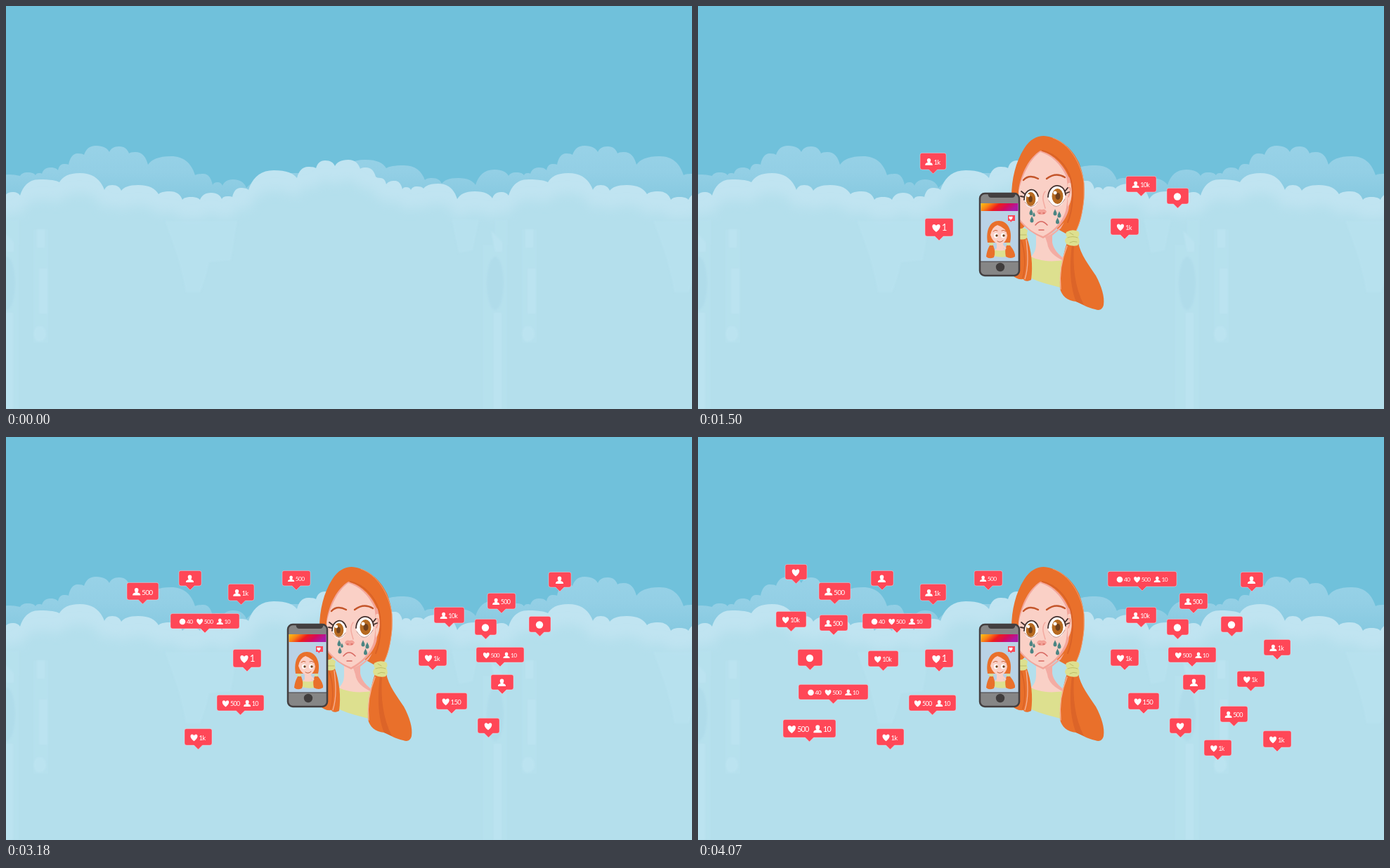
Write an HTML page that moves like this. It is 976 by 574 pixels and loops after 4.17 s.

```html
<!DOCTYPE html>
<html lang="en">
<head>
<meta charset="utf-8">
<title>Likes and tears</title>
<style>
html, body { margin: 0; width: 100%; height: 100%; overflow: hidden; background: #70c1db; }
svg { display: block; width: 976px; height: 574px; }
text { font-family: Lato, "Open Sans", sans-serif; font-size: 9px; letter-spacing: -.7px; fill: #fff; }
.line { fill: none; stroke-linecap: round; stroke-linejoin: round; }
</style>
</head>
<body>
<svg viewBox="0 0 976 574">
  <defs>
    <linearGradient id="haze" gradientUnits="userSpaceOnUse" x1="0" y1="198" x2="0" y2="276">
      <stop offset="0" stop-color="#98d2e7"/><stop offset=".5" stop-color="#93cfe5"/><stop offset="1" stop-color="#86c9e0"/>
    </linearGradient>
    <linearGradient id="stripe" x2="1" y2=".25">
      <stop offset="0" stop-color="#fdc413"/><stop offset=".25" stop-color="#f98416"/><stop offset=".5" stop-color="#ee1c1c"/>
      <stop offset=".75" stop-color="#d60a5c"/><stop offset="1" stop-color="#ad1aa4"/>
    </linearGradient>
    <filter id="soft" x="-5%" y="-10%" width="110%" height="120%"><feGaussianBlur stdDeviation="8"/></filter>
    <filter id="fuzz" x="-20%" y="-5%" width="140%" height="110%"><feGaussianBlur stdDeviation="1"/></filter>
    <path id="heart" d="M0 4.9C-2-2.6 0 0 0 4.9C-6 .8-5.6-4.2-2.6-4.2C-1.2-4.2-.4-3.3 0-2.4C.4-3.3 1.2-4.2 2.6-4.2C5.6-4.2 6 .8 0 4.9Z"/>
    <path id="person" d="M-2.5-2.1A2.5 2.7 0 1 1 2.5-2.1Q2.3 .1 1.3 .8C3.6 1.2 5 2.1 5 4.4H-5C-5 2.1-3.6 1.2-1.3 .8Q-2.3 .1-2.5-2.1Z"/>
    <circle id="dot" r="4.6"/>
    <path id="tear" d="M0-5C.8-2.2 2.5-.6 2.5 1.8A2.5 2.6 0 0 1-2.5 1.8C-2.5-.6-.8-2.2 0-5Z"/>
  </defs>

  <rect width="976" height="574" fill="#70c1db"/>
  <path id="back" fill="url(#haze)"/>
  <path id="front" fill="#c0e4f1"/>
  <path id="body" fill="#b4dfec" transform="translate(0 29)" filter="url(#soft)"/>
  <rect y="330" width="976" height="244" fill="#b4dfec"/>

  <g id="drips" filter="url(#fuzz)">
    <path fill="#b8e2ef" opacity=".75" d="M226 306H329L320 362L289 365Q284 390 276 408H256Q249 370 240 345ZM634 304H673L664 348L644 352Z"/>
    <path fill="#b9e2ef" opacity=".55" d="M678 340H713V574H678ZM734 318H755V480H734ZM695 304H714V340H695Z"/>
    <ellipse cx="696" cy="395" rx="12" ry="38" fill="#b0dcea"/>
    <path fill="#bbe3f0" d="M694 437H705V574H694ZM739 318H750V344H739ZM742 374H754V438H742ZM690 320L706 336V350H696Z"/>
    <ellipse cx="743" cy="467" rx="9" ry="11" fill="#bbe3f0"/>
  </g>
  <use href="#drips" x="-695"/><use href="#drips" x="695"/>

  <g id="girl">
    <!-- hair behind the face -->
    <path fill="#e9702b" d="M446 272C446 246 452 222 464 203C472 190 482 185 492 185C514 187 532 202 542 223C548 238 551 254 549 276C547 296 543 311 537 322L523 324L480 300L458 320L446 300Z"/>
    <path class="line" stroke="#f19a6c" stroke-width="1" d="M505 188C528 196 545 223 549 252V274C547 296 543 310 538 320"/>
    <!-- neck and shirt -->
    <path fill="#f9d0c6" d="M481 318H504V338C506 348 513 354 521 360V372L474 371V357C479 351 481 347 481 338Z"/>
    <path fill="#f3aca3" d="M494 329C505 325 513 317 521 308L516 317L504 327V337C506 347 513 354 521 360V363C508 358 498 349 497 338Z"/>
    <path fill="#dde08f" d="M472 356C480 361 497 366 519 362V402C505 398 490 395 472 387Z"/>
    <!-- face -->
    <path fill="#f3a59a" d="M487 206C503 210 519 224 527 243C534 249 534 270 528 285C527 302 511 321 491 331Q470 322 456 305V263C459 239 471 216 487 206Z"/>
    <path fill="#fad0c6" d="M487 208C502 212 516 225 524 243C527 257 526 279 523 292C519 307 505 321 491 328C475 323 463 311 456 301V265C461 242 472 218 487 208Z"/>
    <path fill="#f9cdbf" d="M526 253Q533 248 532 265Q531 280 526 286Z"/>
    <path class="line" stroke="#ee8f82" stroke-width="1.2" d="M527 259Q531 257 529 266L527 272"/>
    <path class="line" stroke="#da6227" stroke-width="2" d="M490 206C510 211 524 227 530 245C535 265 533 291 526 308"/>
    <!-- brows -->
    <path class="line" stroke="#c4552a" stroke-width="2.4" d="M463 248Q471 239 484 246M496 246Q509 236 522 244"/>
    <!-- eyes -->
    <g fill="#fff">
      <ellipse cx="474" cy="274" rx="10" ry="13"/><ellipse cx="510" cy="271" rx="12" ry="15"/>
    </g>
    <g fill="#b66a20">
      <ellipse cx="473.500" cy="275" rx="6.800" ry="10"/><ellipse cx="511.500" cy="271" rx="8" ry="11"/>
    </g>
    <g fill="#70401b">
      <ellipse cx="473" cy="275" rx="2.800" ry="4.500"/><ellipse cx="512" cy="271" rx="3.500" ry="5"/>
    </g>
    <g fill="#fff"><circle cx="470" cy="270" r="2.200"/><circle cx="508" cy="266" r="2.500"/></g>
    <path class="line" stroke="#43302d" stroke-width="1.8" d="M464 276C464 260 480 256 484 271M465 268L460 264M464 272L459 271M498 272C499 252 521 250 523 269M522 264L526 259M523 267L528 265"/>
    <path class="line" stroke="#b57a70" stroke-width=".9" d="M465 279Q474 293 483 279M499 277Q510 295 522 275"/>
    <!-- nose and mouth -->
    <path class="line" stroke="#f3aaa0" stroke-width="1.5" d="M494 264C488 272 492 280 494 288"/>
    <path fill="#f3a197" d="M482 293Q484 288 489 290Q494 288 496 293Q493 298 489 297Q484 298 482 293Z"/>
    <path class="line" stroke="#d76760" stroke-width="1.5" d="M485 295H487M491 295H493M480 312Q488 302 497 312M485 319H492"/>
    <g fill="#4b8583">
      <use href="#tear" x="474" y="293.500"/><use href="#tear" transform="translate(478 297) scale(.7)"/><use href="#tear" x="475" y="304"/>
      <use href="#tear" x="508" y="294"/><use href="#tear" x="514" y="297"/><use href="#tear" x="511.500" y="306"/>
    </g>
    <!-- pigtails -->
    <path fill="#e9702b" d="M456 330H468C474 347 477 369 474 390C469 393 464 392 463 389C457 390 452 388 448 384Z"/>
    <path class="line" stroke="#f6b195" stroke-width="1.3" d="M467 333C469 350 471 370 465 389"/>
    <path class="line" stroke="#da6227" stroke-width="1.6" d="M460 334C466 352 466 374 462 387"/>
    <path fill="#e9702b" d="M525 337H541C544 354 557 370 566 384C574 399 579 414 577 426C575 433 571 434 565 432C554 430 546 424 538 421C525 420 517 412 515 402C514 380 519 356 525 337Z"/>
    <path fill="#dc6428" d="M532 341C529 364 528 397 538 421L549 426C536 400 533 371 535 341Z"/>
    <path class="line" stroke="#f6b195" stroke-width="1.4" d="M525 342C517 362 514 384 516 403"/>
    <path fill="#dde08f" d="M456 318Q466 314 469 320Q467 325 469 328Q467 334 457 332ZM524 322Q532 317 541 321Q544 325 541 329Q545 336 540 341Q532 343 524 339Q520 333 525 329Q522 326 524 322Z"/>
    <path class="line" stroke="#bdbd68" stroke-width="1" d="M458 326H467M526 330Q533 327 540 330M529 337Q534 334 539 336M529 323L534 326"/>

    <!-- phone -->
    <rect x="401" y="267" width="56" height="117" rx="7" fill="#868686" stroke="#433f40" stroke-width="2.500"/>
    <path fill="#433f40" d="M411 266H454Q451 267 451 270Q450 273 447 273H417Q414 273 413 270Q413 267 411 266Z"/>
    <rect x="402.500" y="281" width="53" height="83" fill="#b9d2e6"/>
    <rect x="402.500" y="281" width="53" height="11" fill="url(#stripe)"/>
    <path class="line" stroke="#433f40" d="M402 364H456"/>
    <circle cx="430" cy="372" r="6.200" fill="#403d3d"/>
    <!-- picture on the screen -->
    <path fill="#e9702b" d="M412 337C409 318 416 306 428 306C440 306 448 319 444 337Z"/>
    <path fill="#f9d0c6" d="M425 335H434V345L440 350H420L425 345Z"/>
    <path fill="#dde08f" d="M420 347Q430 350 439 347L440 357Q430 359 421 356Z"/>
    <path fill="#fad0c6" d="M416 326Q418 315 426 312Q439 316 440 327Q439 336 430 341Q419 337 416 326Z"/>
    <path fill="#e9702b" d="M415 341H420Q424 351 421 358Q414 361 410 357Q411 348 415 341ZM439 341H444Q452 351 451 357Q445 361 438 357Q436 348 439 341Z"/>
    <path class="line" stroke="#dde08f" stroke-width="3" d="M415 339H419M440 339H443"/>
    <path class="line" stroke="#fad0c6" stroke-width="3" d="M434 342L437 345"/>
    <g fill="#fff"><ellipse cx="424" cy="327" rx="3" ry="3.400"/><ellipse cx="434" cy="327" rx="3" ry="3.400"/></g>
    <g fill="#70401b"><circle cx="425" cy="327" r="1.700"/><circle cx="435" cy="327" r="1.700"/></g>
    <path class="line" stroke="#c4552a" stroke-width=".9" d="M420 321Q423 318 426 320M432 320Q435 318 438 321M426 335Q430 338 434 334"/>
    <path fill="#ff4757" d="M441 298H451V306H447L445 308L444 306H441Z"/>
    <use href="#heart" fill="#fff" transform="translate(445 302) scale(.55)"/>
  </g>
  <g id="likes"></g>
</svg>
<script>
const NS = "http://www.w3.org/2000/svg";
const LOOP = 4170, PERIOD = 695;
const get = id => document.getElementById(id);

function add(parent, tag, attrs) {
  const el = parent.appendChild(document.createElementNS(NS, tag));
  for (const k in attrs) el.setAttribute(k, attrs[k]);
  return el;
}

// Each bump: valley x, valley y, peak x, peak y
const backBumps = [
  [20, 242, 31, 237], [42, 241, 47, 238], [51, 239, 63, 230], [74, 234, 82, 225],
  [89, 226, 102, 210], [111, 212, 128, 199], [147, 208, 161, 200], [175, 210, 184, 208],
  [202, 226, 235, 214], [269, 241, 281, 239], [294, 255, 301, 251], [308, 256, 323, 247],
  [342, 259, 415, 238], [480, 232, 512, 219], [541, 231, 566, 227], [596, 248, 606, 245],
  [620, 253, 643, 245], [668, 255, 695, 233]
];
const frontBumps = [
  [20, 270, 48, 247], [76, 251, 105, 238], [140, 262, 151, 255], [164, 263, 188, 255],
  [217, 268, 233, 264], [251, 276, 263, 272], [276, 276, 292, 266], [307, 275, 315, 271],
  [322, 272, 334, 259], [345, 262, 381, 234], [414, 245, 430, 229], [441, 231, 454, 220],
  [468, 228, 487, 219], [504, 232, 512, 230], [526, 243, 533, 245], [541, 254, 553, 249],
  [564, 261, 569, 258], [576, 262, 585, 257], [594, 260, 615, 253], [642, 275, 667, 264],
  [692, 274, 704, 265]
];

function ridge(bumps, shifts, lead) {
  const side = (vx, vy, px, py) => [vx + (px - vx) * .15, vy + (py - vy) * .6, px - (px - vx) * .55, py];
  let d = lead;
  for (const s of shifts) bumps.forEach(([vx, vy, px, py], i) => {
    const next = bumps[i + 1] || [bumps[0][0] + PERIOD, bumps[0][1]];
    const a = side(vx + s, vy, px + s, py);
    const b = side(next[0] + s, next[1], px + s, py);
    d += `L${vx + s} ${vy}C${a} ${px + s} ${py}C${b[2]} ${b[3]} ${b[0]} ${b[1]} ${next[0] + s} ${next[1]}`;
  });
  return d + "V640H-60Z";
}
get("back").setAttribute("d", ridge(backBumps, [0, PERIOD], "M-60 242L-10 242Q4 238 20 242"));
const front = ridge(frontBumps, [-PERIOD, 0, PERIOD], "M-675 640");
get("front").setAttribute("d", front);
get("body").setAttribute("d", front);

// Badges in order of arrival: left, top, width, height, then icon + count
const badges = `323 302 40 26 h1|587 302 40 24 h1k|609 242 43 23 p10k|316 209 37 24 p1k
667 259 31 23 d|393 190 40 22 p500|612 364 44 24 h150|300 367 67 23 h500 p10
685 222 40 23 p500|669 299 68 22 h500 p10|234 251 98 22 d40 h500 p10|690 338 32 22 p
254 415 39 24 h1k|744 255 31 23 d|172 207 45 25 p500|671 400 31 22 h|246 190 32 22 p
772 192 32 22 p|173 253 40 23 p500|805 288 38 23 p1k|111 248 43 23 h10k|743 383 39 23 p500
142 302 35 24 d|720 431 39 23 h1k|143 352 99 22 d40 h500 p10|121 402 75 26 h500 p10
767 333 39 23 h1k|242 304 43 23 h10k|583 191 98 22 d40 h500 p10|124 181 31 22 h|804 418 40 24 h1k`
  .split(/[|\n]/).map(row => row.split(" "));

const waits = [[3, 300], [5, 200], [4, 150], [4, 100], [2, 80], [4, 80], [4, 60], [1, 60], [3, 50], [1, 40]]
  .flatMap(([n, ms]) => Array(n).fill(ms));
const icons = { h: "heart", p: "person", d: "dot" };

function badge(row) {
  const [x, y, w, h] = row.slice(0, 4).map(Number), items = row.slice(4);
  const g = add(get("likes"), "g", { transform: `translate(${x} ${y})`, display: "none" });
  const m = w / 2;
  add(g, "path", {
    fill: "#ff4757", stroke: "#ffd9e0", "stroke-opacity": .55, "stroke-width": .8,
    d: `M3 .4H${w - 3}Q${w} .4 ${w} 3V${h - 3}Q${w} ${h} ${w - 3} ${h}H${m + 6}L${m} ${h + 6}L${m - 6} ${h}H3Q0 ${h} 0 ${h - 3}V3Q0 .4 3 .4Z`
  });
  const solo = items[0].length === 1;
  const scale = solo ? 1.12 : (h / 23) ** 1.5;
  const size = s => 10 + (s.length > 1 ? 1.5 + (s.length - 1) * 4.4 : 0);
  const total = items.reduce((sum, s) => sum + size(s), 6 * (items.length - 1));
  const inner = add(g, "g", { fill: "#fff", transform: `translate(${m - .5} ${h / 2 + 1}) scale(${scale})` });
  let at = -total / 2;
  for (const s of items) {
    add(inner, "use", { href: "#" + icons[s[0]], x: at + 5 });
    const label = add(inner, "text", { x: at + 11.5, y: 3.7 });
    label.textContent = s.slice(1);
    if (s === "h1") label.style.fontSize = "11px";
    at += size(s) + 6;
  }
  return g;
}

const cues = [[get("girl"), 100]];
let start = 100;
badges.forEach((row, i) => cues.push([badge(row), start += waits[i]]));

function draw() {
  const t = performance.now() % LOOP;
  for (const [el, at] of cues) el.setAttribute("display", t >= at ? "inline" : "none");
  requestAnimationFrame(draw);
}
draw();
</script>
</body>
</html>
```
